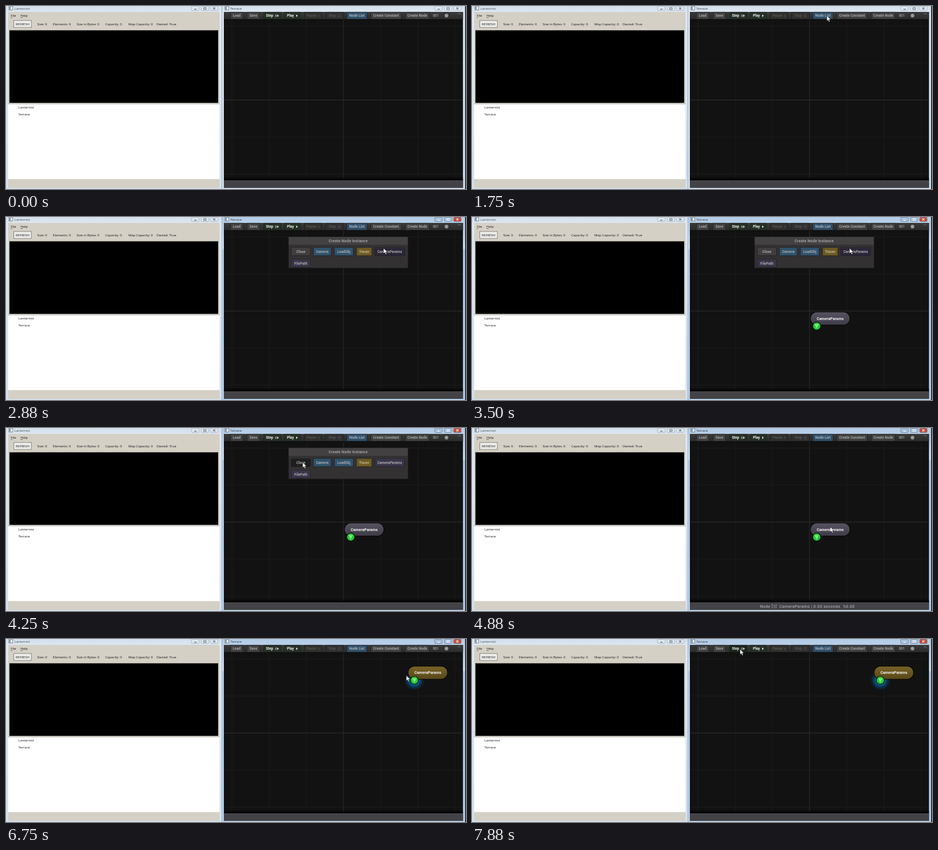
An HTML page for the animation above (8 s loop, 853 by 341 pixels).

```html
<!DOCTYPE html>
<html lang="en">
<head>
<meta charset="utf-8">
<title>Node editor</title>
<style>
html, body { margin: 0; width: 100%; height: 100%; overflow: hidden; background: #d5e2ef; }
svg { display: block; width: 853px; height: 341px; }
text { white-space: pre; }
.ui { font: 6.15px "Open Sans", "Noto Sans", sans-serif; fill: #111; }
.tool { font: 700 6.6px Roboto, sans-serif; }
.mid { text-anchor: middle; }
.status { font: 500 7.7px Roboto, sans-serif; letter-spacing: .3px; fill: #aaa8ad; }
</style>
</head>
<body>
<svg id="stage" viewBox="0 0 853 341">
  <defs>
    <linearGradient id="frame" x2="0" y2="1">
      <stop offset="0" stop-color="#d3dfec"/><stop offset=".04" stop-color="#dfe8f2"/><stop offset="1" stop-color="#d3e1ef"/>
    </linearGradient>
    <linearGradient id="activeFrame" x2="0" y2="1">
      <stop offset="0" stop-color="#b3cbe5"/><stop offset=".17" stop-color="#d3e4f5"/><stop offset=".18" stop-color="#b5cee8"/><stop offset="1" stop-color="#b9d1ea"/>
    </linearGradient>
    <linearGradient id="bar" x2="0" y2="1">
      <stop offset="0" stop-color="#3a3a3b"/><stop offset="1" stop-color="#2b2b2c"/>
    </linearGradient>
    <linearGradient id="gold" x2="0" y2="1">
      <stop offset="0" stop-color="#786327"/><stop offset="1" stop-color="#584718"/>
    </linearGradient>
    <linearGradient id="violet" x2="0" y2="1">
      <stop offset="0" stop-color="#504c5a"/><stop offset="1" stop-color="#36333f"/>
    </linearGradient>
    <linearGradient id="shadow" x2="0" y2="1">
      <stop offset="0" stop-color="#000" stop-opacity="0"/><stop offset="1" stop-color="#000"/>
    </linearGradient>
    <radialGradient id="glowFill">
      <stop offset=".35" stop-color="#0b6cae"/><stop offset=".65" stop-color="#0a4670" stop-opacity=".75"/><stop offset="1" stop-color="#08304e" stop-opacity="0"/>
    </radialGradient>
    <pattern id="mesh" width="2" height="2" patternUnits="userSpaceOnUse">
      <path d="M0 0h1v1h-1zM1 1h1v1h-1z" fill="#8a8696" opacity=".22"/>
    </pattern>
  </defs>
  <g id="scene"></g>
  <g id="panel"></g>
  <g id="node">
    <circle id="glow" cx="-25" cy="14.3" r="19" fill="url(#glowFill)"/>
    <rect id="pill" x="-36.7" y="-12" width="73.4" height="24.4" rx="12.2" stroke="#050505" stroke-width="1.2"/>
    <rect id="weave" x="-36" y="-11.4" width="72" height="23" rx="11.5" fill="url(#mesh)"/>
    <text class="mid" y="2.6" fill="#f2f2f2" style="font:700 7.2px Roboto,sans-serif">CameraParams</text>
    <circle cx="-25" cy="14.3" r="7.4" fill="#29c73a" stroke="#061006" stroke-width="1.2"/>
    <path d="M-29 10.6h8l-4 8.4z" fill="#75ef7c"/>
  </g>
  <text id="status" class="status" x="534" y="334.8">Node [1]  CameraParams | 0.00 seconds  %0.00</text>
  <path id="cursor" d="M0 0V10.2L2.4 8L4.1 11.8L5.9 11L4.2 7.3H7.4Z" fill="#fff" stroke="#111" stroke-width=".7"/>
</svg>
<script>
const LOOP = 8000, STEP = 125;
const $ = id => document.getElementById(id);
const rect = (x, y, w, h, fill, extra = "") =>
  `<rect x="${x}" y="${y}" width="${w}" height="${h}" fill="${fill}" ${extra}/>`;
const label = (x, y, words, cls = "ui", extra = "") =>
  `<text x="${x}" y="${y}" class="${cls}" ${extra}>${words}</text>`;
const line = (d, color, width = 1) =>
  `<path d="${d}" fill="none" stroke="${color}" stroke-width="${width}"/>`;

function button(x, y, w, h, words, fill, ink, id = "") {
  return rect(x, y, w, h, fill, `rx=".8" stroke="#1c1c1d" stroke-width=".7" ${id && `id="${id}"`}`) +
    line(`M${x + .6} ${y + .7}H${x + w - .6}`, "rgba(255,255,255,.07)", .6) +
    label(x + w / 2, y + h / 2 + 2.4, words, "tool mid", `fill="${ink}"`);
}

// Minimise, maximise and close boxes
function captionButtons(x, active) {
  const edge = active ? "#62758c" : "#98a5b3", ink = active ? "#fff" : "#5f6872";
  const cells = [0, 18, 35].map((dx, i) => {
    const fill = active ? (i === 2 ? "#c4503c" : "#a9c0da") : "#dde6ef";
    return rect(x + dx, .4, 14, 8, fill, `rx="1.5" stroke="${edge}" stroke-width=".7"`);
  }).join("");
  return cells + line(`M${x + 5} 6h4.5`, ink, 1.3) +
    rect(x + 22.7, 3, 4.3, 3.3, "none", `stroke="${ink}" stroke-width="1"`) +
    line(`M${x + 40} 2.7l4 3.6m0-3.6l-4 3.6`, ink, 1.1);
}

const appIcon = x => rect(x, 1, 7, 6.5, "#fbfdff", 'stroke="#52606e" stroke-width=".8"') +
  rect(x + 1, 2, 2, 4.5, "#607b96");

function leftWindow() {
  const fields = [[58, "Size: 0"], [87, "Elements: 0"], [131, "Size in Bytes: 0"],
    [184, "Capacity: 0"], [227, "Map Capacity: 0"], [279, "Owned: True"]];
  return rect(0, 0, 400, 341, "url(#frame)") + rect(4, 11, 392, 328, "#d4d0c6") +
    appIcon(5.5) + label(15.5, 7, "Lanternist", "ui", 'style="fill:#454b52"') + captionButtons(344, false) +
    label(9, 20.3, "File") + label(27, 20.3, "Help") +
    line("M9 21.6h3M27 21.6h4", "#222", .6) +
    rect(14.5, 27, 32.5, 13, "#ededeb", 'stroke="#77756f" stroke-width=".9"') +
    label(30.7, 35.6, "REFRESH", "ui mid") +
    fields.map(([x, words]) => label(x, 35.6, words)).join("") +
    rect(5.5, 45, 389, 137, "#f4f2ec") + rect(6.3, 45.3, 387, 135.2, "#000", 'stroke="#45443f" stroke-width=".7"') +
    rect(4, 183, 392, 139.5, "#fff") + line("M4 182.5H396", "#9d9a92", .7) +
    label(23, 191.4, "Lanternist") + label(23, 203.9, "Terrace");
}

function rightWindow() {
  let grid = "";
  for (let i = -3; i <= 3; i++) grid += line(`M${625.9 + i * 69} 25V324`, i ? "#1c1c1c" : "#303030");
  for (let i = -2; i <= 2; i++) grid += line(`M404 ${175.2 + i * 69}H847`, i ? "#1c1c1c" : "#303030");
  const grey = "#414142", ink = "#a5a5a5", green = "#263126", dim = "#303030", off = "#555";
  return rect(400, 0, 453, 341, "url(#frame)") +
    `<g id="active">${rect(401, 0, 451, 341, "url(#activeFrame)")}${captionButtons(795, true)}</g>` +
    `<g id="idle">${captionButtons(795, false)}</g>` +
    line("M400.4 0V341", "#8796a6", .8) + rect(851.3, 0, 1.7, 341, "#17212e") +
    appIcon(406) + label(416, 6.7, "Terrace", "ui", 'style="fill:#30363d"') +
    rect(404, 11, 443.4, 328, "#121212") + grid +
    rect(404, 11, 443.4, 14, "url(#bar)") + line("M404 25.2H847", "#080808", .8) +
    button(416, 11.4, 23.5, 13, "Load", grey, ink) + button(447, 11.4, 23.5, 13, "Save", grey, ink) +
    button(478, 11.4, 32, 13, "", green, "#fff", "stepButton") +
    label(482, 20.2, "Step", "tool", 'fill="#f0f0f0"') +
    line("M499.6 15.8v4.6M501.7 15.8v4.6", "#d7dfd7", .8) + `<path d="M503 15.8l3 2.3-3 2.3z" fill="#d7dfd7"/>` +
    button(516, 11.4, 30, 13, "", green, "#fff") + label(521, 20.2, "Play", "tool", 'fill="#f0f0f0"') +
    `<path d="M538 15.8l3.2 2.3-3.2 2.3z" fill="#d7dfd7"/>` +
    button(553, 11.4, 33, 13, "", "#302f2b", off) + label(557, 20.2, "Pause", "tool", `fill="${off}"`) +
    line("M579 16v4.4M581 16v4.4", off, .8) +
    button(592, 11.4, 34, 13, "", dim, off) + label(598, 20.2, "Stop", "tool", `fill="${off}"`) +
    rect(616, 16, 4, 4, "none", `stroke="${off}" stroke-width=".8"`) +
    button(632, 11.4, 37.5, 13, "Node List", "#31506a", "#a9b4bd") +
    button(676.5, 11.4, 56.5, 13, "Create Constant", grey, ink) +
    button(740.5, 11.4, 44.5, 13, "Create Node", grey, ink) +
    label(797, 20.2, "001", "tool mid", `fill="${ink}" style="font-weight:500"`) +
    `<circle cx="816.8" cy="17.8" r="5.2" fill="#4b4b4c" stroke="#222"/><circle cx="816.8" cy="17.8" r="3.1" fill="#9a9a9a"/>` +
    label(840, 15.6, "", "mid", 'id="rate" fill="#777" style="font:4px Roboto,sans-serif"') +
    rect(404, 318, 443.4, 7, "url(#shadow)") + rect(404, 325, 443.4, 14, "#434246") +
    line("M404 325.4H847", "#56555a", .8);
}

function nodePanel() {
  const blue = "#30536c", violet = "#3a354a", ink = "#a9a9ac";
  return rect(524, 37, 221.3, 58, "#333132", 'stroke="#222" stroke-width=".7"') +
    rect(524.3, 37.3, 220.7, 14.5, "#434142") +
    label(634.5, 47.1, "Create Node Instance", "mid", 'fill="#b2b0b1" style="font:500 7.1px Roboto,sans-serif;letter-spacing:.2px"') +
    button(529, 57, 35.5, 15, "Close", "#403e3f", ink, "closeButton") +
    button(570, 57, 33, 15, "Camera", blue, ink) +
    button(609, 57, 35, 15, "LoadObj", blue, ink) +
    button(650, 57, 28.5, 15, "Tracer", "#6d5b23", "#c0b590") +
    button(684, 57, 55, 15, "CameraParams", violet, ink, "paramsButton") +
    button(529, 79, 35.5, 14.5, "FilePath", violet, ink);
}

$("scene").innerHTML = leftWindow() + rightWindow();
$("panel").innerHTML = nodePanel();

// Each stop: time, x, y
const cursorPath = [[1000, 690, -14], [1500, 658, 18], [2125, 658, 18], [2750, 700, 58], [3500, 700, 58],
  [4125, 550, 64], [4375, 550, 64], [4750, 664, 184], [5000, 664, 184], [5500, 780, 58],
  [5750, 780, 58], [5875, 782, 57], [6250, 757, 75], [6625, 757, 75], [7000, 700, 48], [7500, 497, 19], [8000, 497, 19]];
const nodePath = [[5000, 664.2, 189], [5500, 780.4, 63.8], [5750, 780.4, 63.8], [5875, 782.2, 62.6]];

function along(path, t) {
  const i = path.findIndex(stop => stop[0] > t);
  if (i < 0) return path[path.length - 1].slice(1);
  if (i === 0) return path[0].slice(1);
  const [a, b] = [path[i - 1], path[i]];
  const k = (t - a[0]) / (b[0] - a[0]), ease = k * k * (3 - 2 * k);
  return [a[1] + (b[1] - a[1]) * ease, a[2] + (b[2] - a[2]) * ease];
}

const show = (id, on) => $(id).style.display = on ? "" : "none";
const place = (id, [x, y]) => $(id).setAttribute("transform", `translate(${x} ${y})`);
const paint = (id, color) => $(id).setAttribute("fill", color);

function draw(now) {
  const t = Math.floor((now % LOOP) / STEP) * STEP;
  const between = (from, to = LOOP) => t >= from && t < to;
  const dragged = t >= 5000;
  show("active", between(2000));
  show("idle", !between(2000));
  show("panel", between(2125, 4375));
  show("node", between(3125));
  show("glow", between(6375));
  show("weave", !dragged);
  show("status", between(4625, 6125));
  show("cursor", between(1000));
  paint("pill", dragged ? "url(#gold)" : "url(#violet)");
  paint("closeButton", between(4125) ? "#1f1e1f" : "#403e3f");
  paint("paramsButton", between(2625, 3625) ? "#2b2738" : "#3a354a");
  paint("stepButton", between(7375) ? "#1b261b" : "#263126");
  place("node", along(nodePath, t));
  place("cursor", along(cursorPath, t));
  $("rate").textContent = 140 + (t / STEP * 7) % 23;
}

function tick(now) {
  draw(now);
  requestAnimationFrame(tick);
}
draw(0);
requestAnimationFrame(tick);
</script>
</body>
</html>
```
